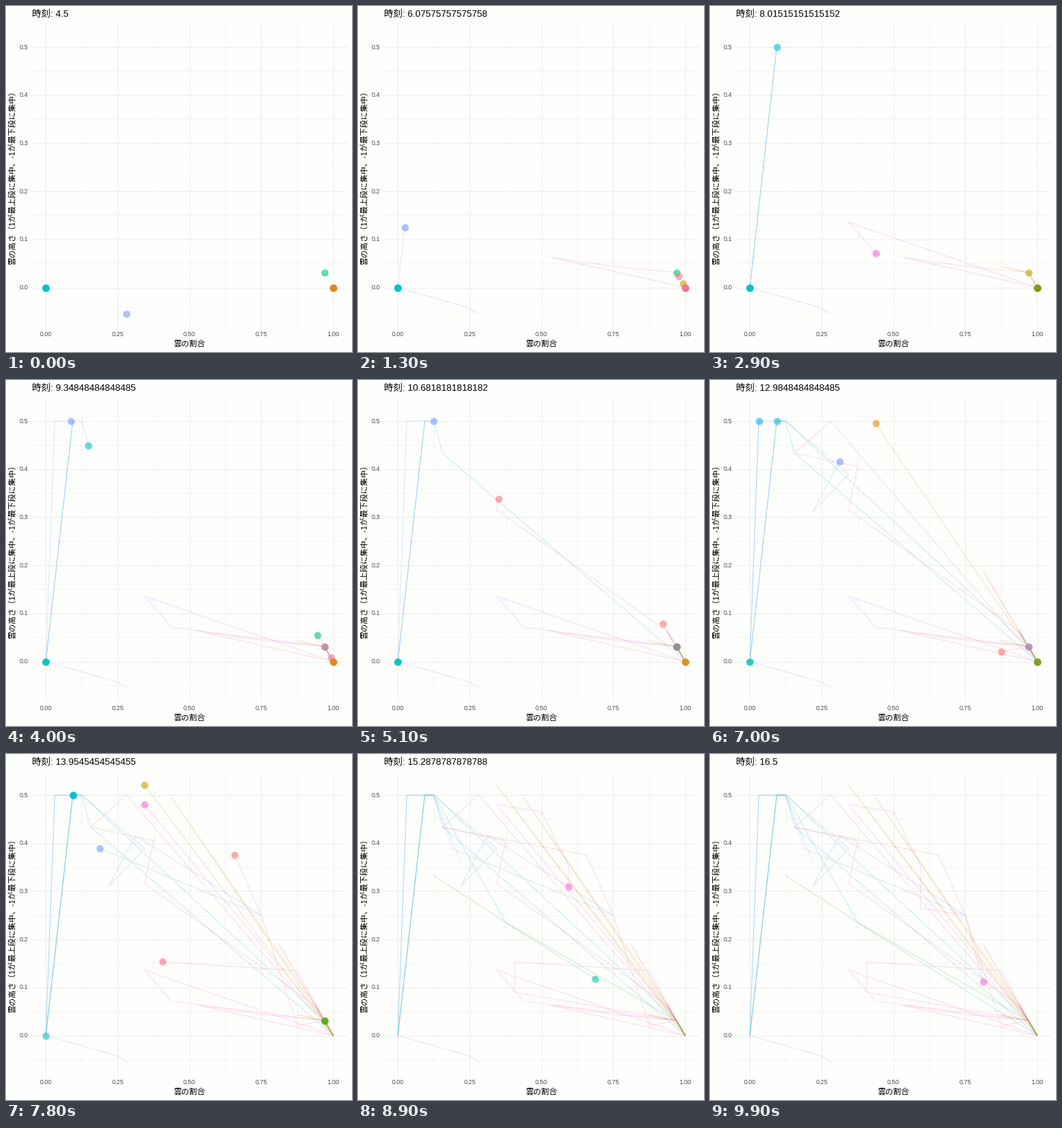
Write a matplotlib script that moves like this. It is 480 px wide and 480 px high and loops after 10 s.

```python
import matplotlib.pyplot as plt
import numpy as np
from matplotlib.animation import FuncAnimation

SIZE, FRAMES = 480, 100
T0, T1, STEPS = 4.5, 16.5, 24
LEFT, RIGHT, TOP, BOTTOM = 35.3, 473.9, 25, 446.5
X0, X_UNIT, Y0, Y_UNIT = 55.2, 398.7, 390.5, 667
GRID, TICK = "#eeeeee", "#4d4d4d"

plt.rcParams["font.family"] = ["Liberation Sans", "Noto Sans CJK JP"]

fig = plt.figure(figsize=(SIZE / 72, SIZE / 72), dpi=72, facecolor="#fefefd")
ax = fig.add_axes([LEFT / SIZE, 1 - BOTTOM / SIZE,
                   (RIGHT - LEFT) / SIZE, (BOTTOM - TOP) / SIZE])
ax.set_xlim(-0.05, 1.05)
ax.set_ylim((Y0 - BOTTOM) / Y_UNIT, (Y0 - TOP) / Y_UNIT)
ax.axis("off")


def label(x, y, text, size, color="black", ha="center", va="center", **kw):
    return fig.text(x / SIZE, 1 - y / SIZE, text, fontsize=size, color=color,
                    ha=ha, va=va, **kw)


def grid(xs, ys, width):
    for x in xs:
        ax.axvline(x, color=GRID, lw=width, zorder=0)
    for y in ys:
        ax.axhline(y, color=GRID, lw=width, zorder=0)


x_ticks = np.linspace(0, 1, 5)
y_ticks = np.linspace(0, 0.5, 6)
grid(x_ticks[:-1] + 0.125, y_ticks - 0.05, 0.6)
grid(x_ticks, y_ticks, 1)
for x in x_ticks:
    label(X0 + X_UNIT * x, 456, f"{x:.2f}", 8.8, TICK)
for y in y_ticks:
    label(31, Y0 - Y_UNIT * y, f"{y:.1f}", 8.8, TICK, ha="right")
label(254.5, 472, "雲の割合", 11, va="baseline")
label(9, 236, "雲の高さ（1が最上段に集中、-1が最下段に集中）", 11, rotation=90)
title = label(36, 15, "", 12.9, ha="left", va="baseline")


def hcl(hue, chroma=100, lum=65):
    """Evenly bright colour: polar CIE-LUV to sRGB."""
    h = np.radians(hue)
    u = chroma * np.cos(h) / (13 * lum) + 0.1978
    v = chroma * np.sin(h) / (13 * lum) + 0.4683
    y = ((lum + 16) / 116) ** 3
    xyz = y * np.array([9 * u / (4 * v), 1, (12 - 3 * u - 20 * v) / (4 * v)])
    to_rgb = np.array([[3.2406, -1.5372, -0.4986],
                       [-0.9689, 1.8758, 0.0415],
                       [0.0557, -0.2040, 1.0570]])
    rgb = np.clip(to_rgb @ xyz, 0, 1)
    return np.where(rgb < 0.0031, 12.92 * rgb, 1.055 * rgb ** (1 / 2.4) - 0.055)


# The sky has 32 cells: a few high clouds, or a cover with n cells open
def cell(n, height=0.5):
    return n / 32, height


def gap(n):
    return cell(32 - n, min(n / 32, 0.34 + 0.0086 * n))


CLEAR, FULL = cell(0, 0), gap(0)
THIN, FEW, SOME, LOW = cell(1), cell(3), cell(4), cell(5, 0.433)
NEAR, MOST = gap(1), gap(2)


class Day:
    """Stays at home, then takes one stop of the route each half hour."""

    def __init__(self, hue, home, leave, route, start=0):
        self.xy = np.array([home] * (leave - start) + route)
        steps = np.arange(start, start + len(self.xy))
        self.keys = np.round(steps * (FRAMES - 1) / STEPS)
        color = np.clip(hcl(hue), 0, 1)
        self.line, = ax.plot([], [], color=color, lw=1, alpha=0.24, zorder=2)
        self.dot, = ax.plot([], [], "o", color=color, ms=10, mew=0,
                            alpha=0.58, zorder=3)
        self.dot.set_snap(False)

    def show(self, frame):
        path, dot = self.xy[self.keys <= frame], np.empty((0, 2))
        if self.keys[0] <= frame <= self.keys[-1]:
            dot = np.array([[np.interp(frame, self.keys, a) for a in self.xy.T]])
        self.dot.set_data(*dot.T)
        self.line.set_data(*np.vstack([path, dot]).T)


days = [
    Day(258, cell(9, -0.055), 1,
        [cell(8, -0.043)] + [CLEAR] * 2 + [FEW] * 2 + [CLEAR] * 2
        + [THIN, cell(2), FEW] + [SOME] * 4
        + [cell(11, 0.389), cell(7, 0.311), cell(10, 0.416), gap(8),
           cell(6, 0.389), SOME, cell(7, 0.36)]),
    Day(230, CLEAR, 17, [THIN, FEW, FEW, SOME]),
    Day(180, CLEAR, 19, [FEW, SOME, cell(12, 0.235), FULL]),
    Day(200, CLEAR, 7, [FEW, SOME, SOME, LOW, FULL] + [NEAR] * 3
        + [SOME] + [FEW] * 4),
    Day(195, CLEAR, 20, [CLEAR]),
    Day(160, NEAR, 6, [FULL] * 3 + [NEAR, MOST] + [NEAR] * 9 + [MOST, FULL]),
    Day(10, FULL, 11, [MOST, cell(11, 0.316), cell(12, 0.405), LOW, LOW,
                       cell(9), FULL]),
    Day(15, FULL, 12, [MOST, gap(4), MOST, gap(6), NEAR, cell(28, 0.02),
                       gap(8), cell(21, 0.375), LOW]),
    Day(0, FULL, 1, [cell(17, 0.063), cell(24, 0.044), NEAR] + [FULL] * 5
        + [NEAR] + [FULL] * 8
        + [cell(28, 0.135), cell(13, 0.153), cell(13, 0.09), NEAR]),
    Day(65, FULL, 4, [NEAR, cell(28, 0.043), NEAR, NEAR] + [FULL] * 11
        + [gap(21), NEAR, FULL]),
    Day(45, FULL, 14, [MOST, MOST, FULL, gap(18), MOST, NEAR, FULL]),
    Day(125, FULL, 9, [NEAR] * 5 + [FULL] * 4 + [NEAR] * 2
        + [cell(12, 0.235), cell(4, 0.333)], start=5),
    Day(320, FULL, 6, [cell(11, 0.136), cell(14, 0.071)] + [NEAR] * 7
        + [gap(1.7), MOST, NEAR, NEAR, cell(11, 0.48), cell(16, 0.465),
           cell(19, 0.355), cell(19, 0.265), gap(8), cell(26, 0.111)], start=1),
]


def draw(frame):
    now = T0 + (T1 - T0) * frame / (FRAMES - 1)
    title.set_text(f"時刻: {now:.15g}")
    for day in days:
        day.show(frame)
    return []


anim = FuncAnimation(fig, draw, frames=FRAMES, interval=100,
                     repeat=True, repeat_delay=0, blit=False)
plt.show()
```
